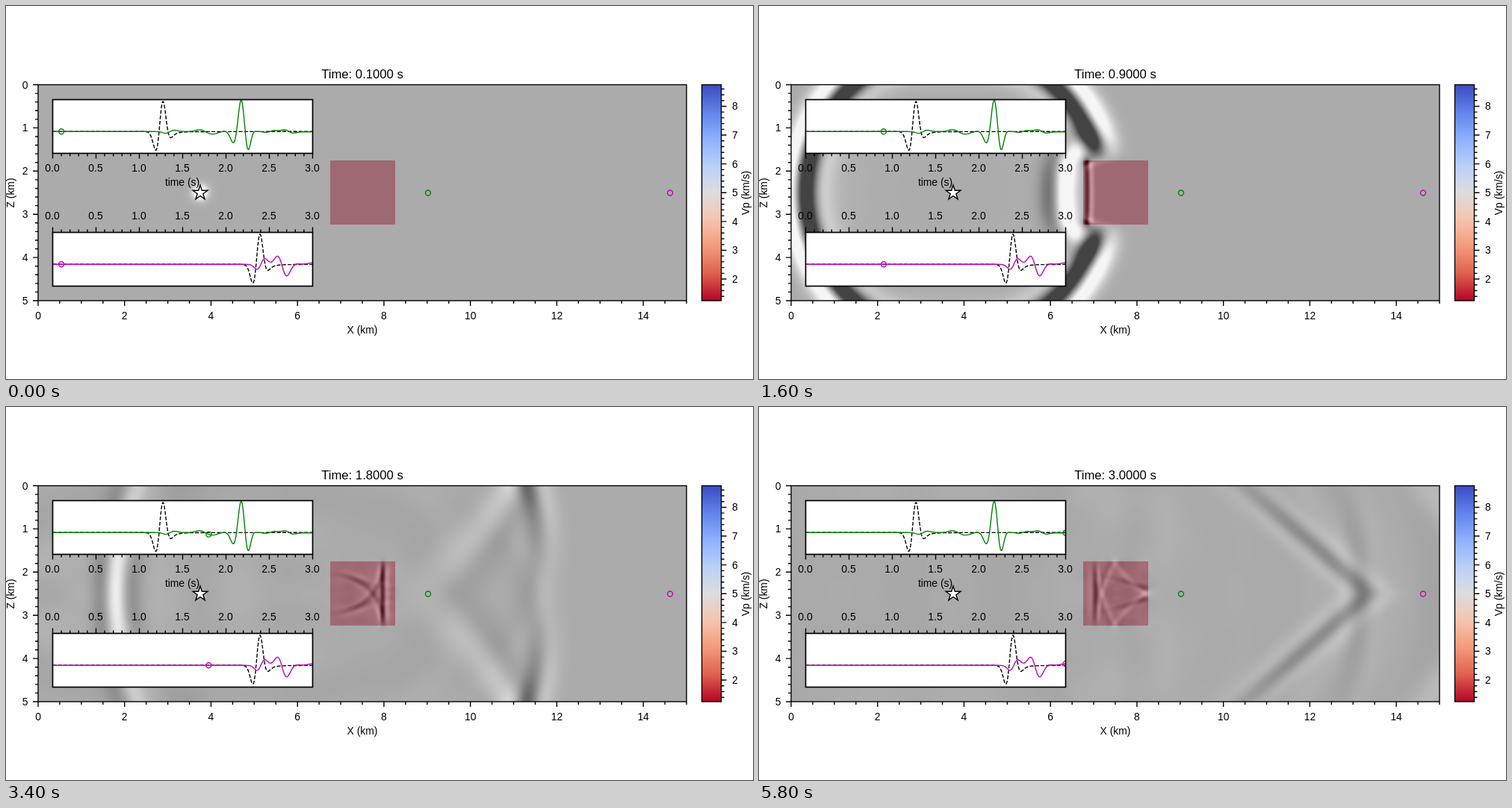
Animation of 1000x500 px, one loop 6 s. Source, as an HTML page with a canvas:

```html
<!DOCTYPE html>
<html lang="en">
<head>
<meta charset="utf-8">
<title>Wave field</title>
<style>
html, body { margin: 0; width: 100%; height: 100%; overflow: hidden; background: #fff; }
canvas { position: absolute; left: 43px; top: 105px; width: 868px; height: 290px; }
svg { position: absolute; left: 0; top: 0; }
text { font: 13.89px "Liberation Sans", Arial, sans-serif; fill: #000; }
.title { font-size: 16.67px; }
.line { fill: none; stroke: #000; stroke-width: 1.39; }
.trace { fill: none; stroke-width: 1.39; stroke-linejoin: round; }
</style>
</head>
<body>
<canvas id="field" width="600" height="200"></canvas>
<svg id="stage" width="1000" height="500" viewBox="0 0 1000 500"></svg>
<script>
const NX = 600, NZ = 100;            // upper half only; the model is symmetric in z
const DX = 0.025, DT = 0.0025, SPEED = 5, SLOW = 1.25;
const PAD = 50, W = NX + PAD + PAD, H = NZ + PAD + 2;
const STEPS = 1200, SNAP = 40;
const GREEN = '#008000', MAGENTA = '#bf00bf';
const RECEIVERS = [360, 584];

const ricker = t => {
  const a = (Math.PI * 5 * (t - 0.2)) ** 2;
  return (1 - 2 * a) * Math.exp(-a);
};
const smooth = x => {
  const c = Math.min(1, Math.max(0, x));
  return c * c * (3 - 2 * c);
};

// Finite differences, fourth order in space, damped margins.
function simulate() {
  let u = new Float32Array(W * H), p = new Float32Array(W * H);
  const gain = new Float32Array(W * H), mod = new Float32Array(W * H);
  for (let j = 0; j < H; j++) for (let i = 0; i < W; i++) {
    const x = (i - PAD + 0.5) * DX, z = (j - 1.5) * DX;
    const qx = Math.max(0, PAD - i, i - (W - PAD - 1)) / PAD;
    const qz = Math.max(0, j - NZ - 1) / PAD;
    const v = x > 6.75 && x < 8.25 && z < 0.75 ? SLOW : SPEED;
    gain[j * W + i] = 1 / (1 + 0.08 * (qx * qx + qz * qz));
    mod[j * W + i] = (v * DT / DX) ** 2 / 12;
  }
  const snaps = [], traces = RECEIVERS.map(() => [0]);
  const src = 2 * W + PAD + 149;
  const drive = 2 * Math.PI * SPEED ** 2 * (DT / DX) ** 2 / 4;
  for (let n = 1; n <= STEPS; n++) {
    u.copyWithin(W, 2 * W, 3 * W);
    u.copyWithin(0, 3 * W, 4 * W);
    for (let j = 2; j < H - 2; j++) {
      for (let k = j * W + 2, end = j * W + W - 2; k < end; k++) {
        const c = u[k];
        const lap = 16 * (u[k - 1] + u[k + 1] + u[k - W] + u[k + W]) - 60 * c
          - u[k - 2] - u[k + 2] - u[k - 2 * W] - u[k + 2 * W];
        p[k] += gain[k] * (2 * (c - p[k]) + mod[k] * lap);
      }
    }
    const s = drive * ricker((n - 1) * DT);
    p[src] += s;
    p[src + 1] += s;
    [u, p] = [p, u];
    RECEIVERS.forEach((r, i) => traces[i].push(u[2 * W + PAD + r]));
    if (n % SNAP === 0) {
      const snap = new Float32Array(NX * NZ);
      for (let j = 0; j < NZ; j++) {
        const from = (j + 2) * W + PAD;
        snap.set(u.subarray(from, from + NX), j * NX);
      }
      snaps.push(snap);
    }
  }
  return { snaps, traces };
}

// Response of the uniform medium at distance r.
function uniform(r) {
  const tau = r / SPEED, out = [];
  for (let n = 0; n <= STEPS; n++) {
    let sum = 0;
    for (let q = 0.005; q < 2; q += 0.01) {
      const t = n * DT - tau * Math.cosh(q);
      if (t < 0) break;
      sum += ricker(t);
    }
    out.push(sum * 0.01);
  }
  return out;
}

const { snaps, traces } = simulate();
const plain = RECEIVERS.map(r => uniform((r + 0.5) * DX - 3.75));
const peaks = plain.map(d => Math.max(...d));
const range = peaks[0] * 0.82 * (1 + 1 / 1.4);

const ctx = document.getElementById('field').getContext('2d');
const image = ctx.createImageData(NX, 2 * NZ);
const pixels = new Uint32Array(image.data.buffer);

function drawField(index) {
  const snap = snaps[index], t = (index + 1) / 10;
  const w = smooth((t - 2.2) / 0.35), age = Math.max(0.1, t - 2.016);
  const tip = 810 - 290 * (3 - t), slope = 1.15 * w;
  const amp = 0.18 * Math.sqrt(0.984 / age) * w;
  for (let j = 0; j < NZ; j++) {
    const dz = (j + 0.5) * 1.45;
    const front = tip - Math.hypot(slope * dz, 8) + 8;
    const env = amp * Math.exp(-((dz / (152 * age)) ** 4));
    for (let i = 0; i < NX; i++) {
      let n = snap[j * NX + i] / range;
      if (w > 0) {
        const x = 43 + (i + 0.5) * 868 / NX;
        n *= 1 - 0.75 * w * smooth((x - 540) / 30) * smooth((tip + 60 - x) / 30);
        const a = ((x - front) / Math.hypot(1, slope) / 16) ** 2;
        if (a < 12) n += env * (1 - 2 * a) * Math.exp(-a);
      }
      const g = Math.round(255 * Math.min(1, Math.max(0, 0.583 - n)));
      const color = 0xff000000 | g << 16 | g << 8 | g;
      pixels[(NZ - 1 - j) * NX + i] = color;
      pixels[(NZ + j) * NX + i] = color;
    }
  }
  ctx.putImageData(image, 0, 0);
}

const svg = document.getElementById('stage');
function add(tag, attrs, content) {
  const el = document.createElementNS('http://www.w3.org/2000/svg', tag);
  for (const k in attrs) el.setAttribute(k, attrs[k]);
  if (content !== undefined) el.textContent = content;
  svg.appendChild(el);
  return el;
}
const label = (x, y, s, anchor = 'middle') => add('text', { x, y, 'text-anchor': anchor }, s);
const upright = (x, y, s) =>
  add('text', { transform: `translate(${x} ${y}) rotate(-90)`, 'text-anchor': 'middle' }, s);
const box = (x, y, width, height, fill = 'none') =>
  add('rect', { x, y, width, height, class: 'line', style: `fill:${fill}` });
const ring = (cx, cy, stroke) =>
  add('circle', { cx, cy, r: 3.5, fill: 'none', stroke, 'stroke-width': 1.39 });

// Ticks: count steps from (x, y) by (dx, dy), pointing along (ox, oy), every nth long.
function ticks(x, y, dx, dy, count, nth, ox, oy, first = 0) {
  let d = '';
  for (let i = 0; i < count; i++) {
    const len = (i + first) % nth ? 4 : 7;
    d += `M${x + i * dx} ${y + i * dy}l${ox * len} ${oy * len}`;
  }
  add('path', { d, class: 'line' });
}

// Velocity overlay
add('path', {
  d: 'M43 105H911V395H43ZM434 207V293H521V207Z', fill: '#ddd', opacity: 0.3,
  'fill-rule': 'evenodd', 'shape-rendering': 'crispEdges'
});
add('rect', {
  x: 434, y: 207, width: 87, height: 86, fill: '#b40426', opacity: 0.3,
  'shape-rendering': 'crispEdges'
});

// Main axes
const KM = 868 / 15;
box(43, 105.5, 868, 289.5);
ticks(43, 395, KM / 2, 0, 31, 4, 0, 1);
ticks(43, 105.5, 0, 11.58, 26, 5, -1, 0);
for (let i = 0; i <= 14; i += 2) label(43 + i * KM, 420, i);
for (let i = 0; i <= 5; i++) label(29.5, 110.5 + i * 57.9, i, 'end');
label(477, 439, 'X (km)');
upright(11, 250.5, 'Z (km)');
const title = label(477, 97, '');
title.setAttribute('class', 'title');

// Colour bar
const defs = add('defs', {});
const stops = ['#3b4cc0', '#6182ea', '#8db0fe', '#b8d0f9', '#dddddd', '#f5c4ad', '#f49a7b', '#de604d', '#b40426'];
defs.innerHTML = '<linearGradient id="bar" x2="0" y2="1">' +
  stops.map((c, i) => `<stop offset="${i / 8}" stop-color="${c}"/>`).join('') +
  '</linearGradient><clipPath id="inset"><rect x="62" y="120" width="348.5" height="260"/></clipPath>';
box(931.5, 105.5, 26, 289.5, 'url(#bar)');
const perKm = 289.5 / 7.5;
ticks(957.5, 395 - 0.15 * perKm, 0, -perKm / 5, 37, 5, 1, 0, 2);
for (let i = 2; i <= 8; i++) label(972, 400 - (i - 1.25) * perKm, i, 'start');
upright(995, 250.5, 'Vp (km/s)');

// Source and receivers
let star = '';
for (let i = 0; i < 10; i++) {
  const r = i % 2 ? 4 : 10.4, a = i * Math.PI / 5;
  star += `${260 + r * Math.sin(a)},${250.5 - r * Math.cos(a)} `;
}
ring(565, 250.5, GREEN);
ring(889, 250.5, MAGENTA);

// Insets
function inset(top, base, color, i) {
  box(62.5, top, 348, 72, '#fff');
  const yAt = v => base - v / peaks[i] * 40.5;
  const line = data => {
    let d = '';
    for (let n = 0; n <= STEPS; n += 3)
      d += `${d ? 'L' : 'M'}${(62.5 + n * DT * 116).toFixed(2)} ${yAt(data[n]).toFixed(2)}`;
    return d;
  };
  add('path', { d: line(plain[i]), class: 'trace', stroke: '#000', 'stroke-dasharray': '5.1 2.2' });
  add('path', { d: line(traces[i]), class: 'trace', stroke: color });
  const dot = ring(0, 0, color);
  dot.setAttribute('clip-path', 'url(#inset)');
  box(62.5, top, 348, 72);
  return n => {
    dot.setAttribute('cx', 62.5 + n * DT * 116);
    dot.setAttribute('cy', yAt(traces[i][n]));
  };
}
const dots = [inset(125.5, 168.3, GREEN, 0), inset(303.5, 346.3, MAGENTA, 1)];
ticks(62.5, 197.5, 11.6, 0, 31, 5, 0, 1);
ticks(62.5, 303.5, 11.6, 0, 31, 5, 0, -1);
for (let i = 0; i <= 6; i++) {
  const s = (i / 2).toFixed(1);
  label(62 + i * 58, 222, s);
  label(62 + i * 58, 286, s);
}
label(236, 241, 'time (s)');
add('polygon', { points: star, fill: '#fff', stroke: '#000', 'stroke-width': 1.39 });

let shown = -1;
function show(ms) {
  const index = Math.floor((ms % 6000) / 200);
  if (index === shown) return;
  shown = index;
  drawField(index);
  title.textContent = `Time: ${((index + 1) / 10).toFixed(4)} s`;
  dots.forEach(move => move((index + 1) * SNAP));
}

show(0);
const start = performance.now();
function tick() {
  show(Math.max(0, performance.now() - start));
  requestAnimationFrame(tick);
}
requestAnimationFrame(tick);
</script>
</body>
</html>
```
